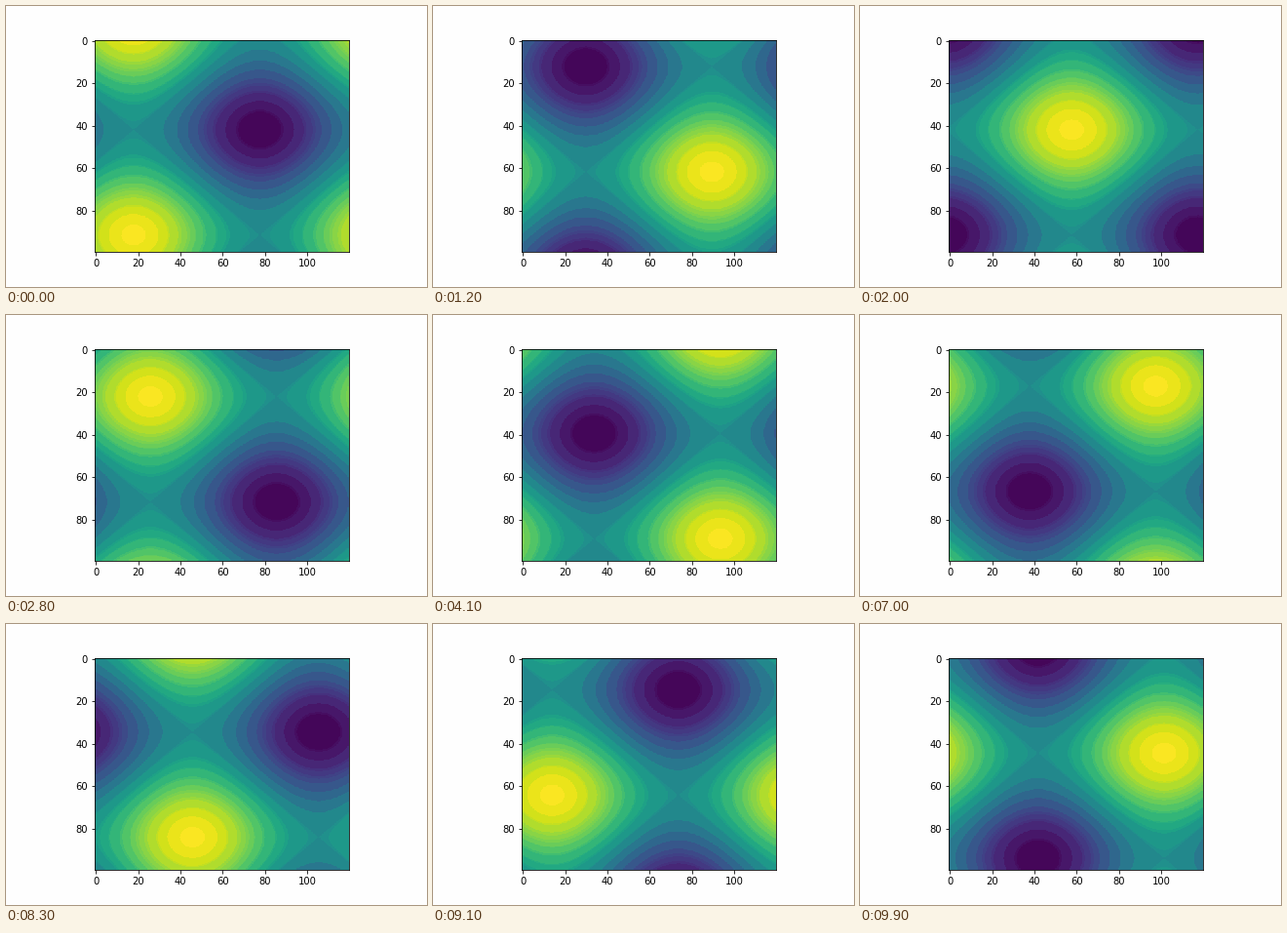
A matplotlib script for the animation above (10 s loop, 432 px wide and 288 px high).

```python
import matplotlib.pyplot as plt
import numpy as np
from matplotlib.animation import FuncAnimation
from matplotlib.colors import ListedColormap

FRAMES, INTERVAL = 100, 100
FIRST_STEP = 3

x = np.linspace(0, 2 * np.pi, 120)
y = np.linspace(0, 2 * np.pi, 100).reshape(-1, 1)

# Viridis colours grouped into coarse RGB cells, which gives the colour bands.
rgb = plt.get_cmap("viridis")(np.arange(256), bytes=True)[:, :3].astype(int)
cell = (rgb[:, 0] >> 5) * 128 + (rgb[:, 1] >> 4) * 8 + (rgb[:, 2] >> 5)
_, band = np.unique(cell, return_inverse=True)


def field(step):
    return np.sin(x + step * np.pi / 15) + np.cos(y + step * np.pi / 20)


def banded_cmap(data, vmin, vmax):
    """Give each band the mean colour of the data that falls into it."""
    level = np.clip((data - vmin) / (vmax - vmin) * 256, 0, 255).astype(int)
    weight = np.bincount(level.ravel(), minlength=256) + 1e-6
    total = np.bincount(band, weight)
    mean = [np.bincount(band, weight * channel) / total for channel in rgb.T]
    colors = np.floor(np.transpose(mean) + 1e-6)[band]
    return ListedColormap((colors + 0.25) / 255)


fig, ax = plt.subplots(figsize=(6, 4), dpi=72, facecolor="#fefefe")
fig.subplots_adjust(left=0.125, right=0.9, bottom=0.125, top=0.88)
image = ax.imshow(field(0))


def update(frame):
    data = field(frame + FIRST_STEP)
    image.set_data(data)
    image.set_cmap(banded_cmap(data, *image.get_clim()))
    return [image]


anim = FuncAnimation(fig, update, frames=FRAMES, interval=INTERVAL,
                     init_func=lambda: update(0), repeat=True, repeat_delay=0)
plt.show()
```
